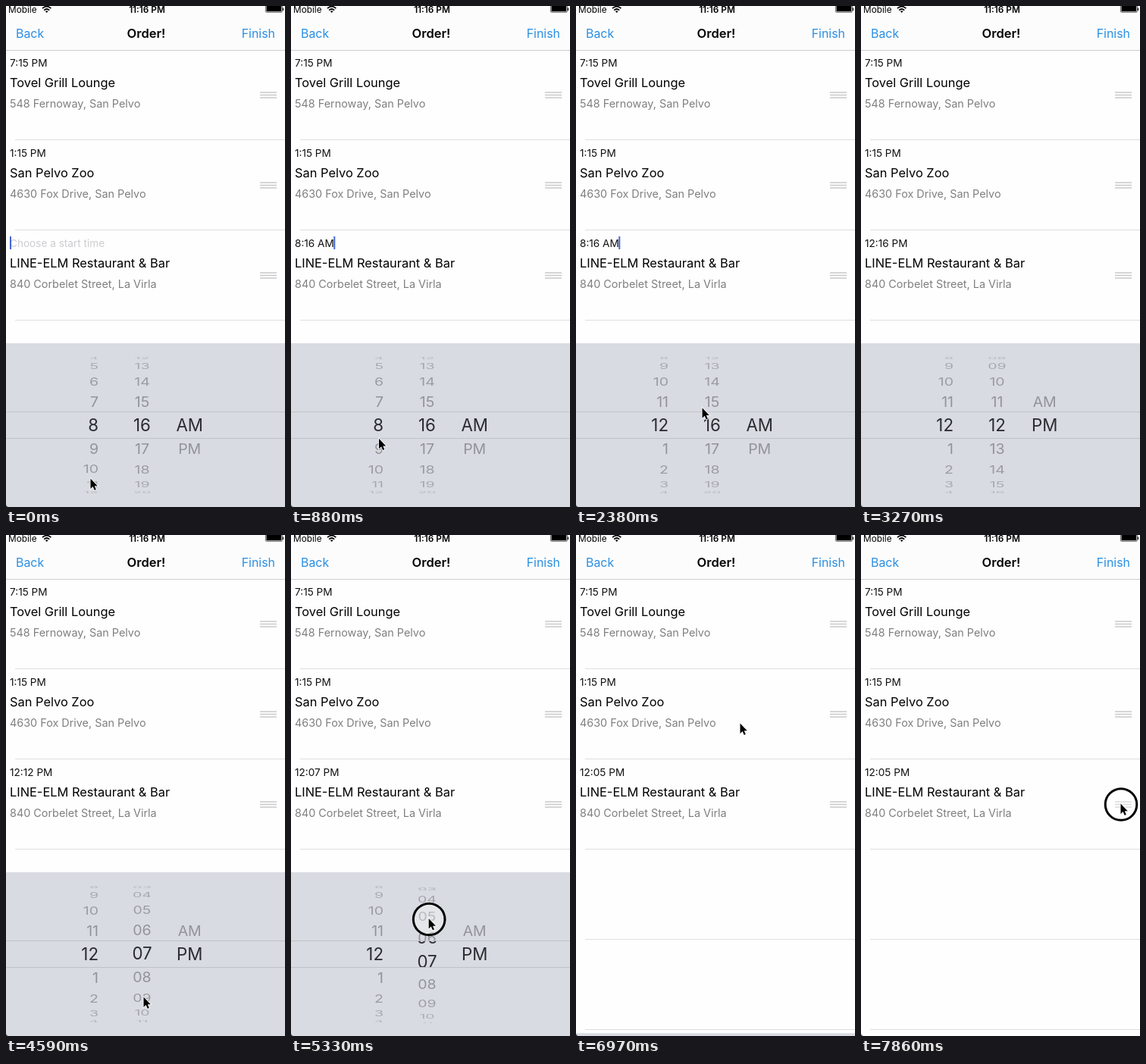
An HTML page that plays this animation: 368x661 px, repeating every 8000 ms.

```html
<!DOCTYPE html>
<html lang="en">
<head>
<meta charset="utf-8">
<title>Order</title>
<style>
  html, body { margin: 0; width: 100%; height: 100%; overflow: hidden; background: #fefefe; }
  svg { display: block; width: 100%; height: 100%; font-family: Inter, Roboto, sans-serif; }
  text { white-space: pre; }
  .status { font-size: 11.8px; }
  .bold { font-weight: 600; }
  .nav { font-size: 16.5px; }
  .link { font-size: 15.9px; fill: #2a8fe3; }
  .time { font-size: 13.6px; fill: #111; }
  .time.empty { fill: #cdcdd1; }
  .place { font-size: 16.4px; }
  .address { font-size: 14.4px; fill: #7f7f7f; }
  .rule { stroke: #dededf; }
  .grip { stroke: #c9c9cc; stroke-width: 1.3; }
  .band { stroke: #bfc2c7; }
  .rim { font-size: 19.5px; fill: #8f9196; }
  .lens { font-size: 22.3px; fill: #2a2c30; }
</style>
</head>
<body>
<svg viewBox="0 0 368 661" preserveAspectRatio="none">
  <defs>
    <clipPath id="inside"><path d="M0 536H368V570H0z"/></clipPath>
    <clipPath id="outside"><path d="M0 445H368V535H0zM0 571H368V661H0z"/></clipPath>
  </defs>
  <rect width="368" height="661" fill="#fefefe"/>
  <rect width="368" height="58" fill="#fcfcfc"/>
  <path d="M0 58.5H368" stroke="#cfcfd0"/>

  <text class="status" x="3" y="8.5">Mobile</text>
  <g fill="none" stroke="#000" stroke-width="1.7">
    <path d="M48 3.2Q53.7-2 59.4 3.2M50.2 5.6Q53.7 2.4 57.2 5.6"/>
    <path d="M51.9 7L53.7 9 55.5 7Q53.7 5.6 51.9 7z" fill="#000" stroke="none"/>
  </g>
  <text class="status bold" x="186" y="8.5" text-anchor="middle">11:16 PM</text>
  <rect x="342.4" y="-2" width="22" height="10.3" rx="1.5" fill="none" stroke="#000" stroke-width=".6"/>
  <path d="M343.5 0H363.3V7.2H343.5zM365 2.5H366V6H365z"/>

  <text class="link" x="13" y="42">Back</text>
  <text class="nav bold" x="185" y="42" text-anchor="middle">Order!</text>
  <text class="link" x="355" y="42" text-anchor="end">Finish</text>

  <g id="list"></g>
  <rect id="caret" y="304" width="2" height="17" fill="#4567d6"/>

  <g id="picker">
    <rect y="445" width="368" height="220" fill="#d8dbe1"/>
    <path class="band" d="M0 535.5H368M0 570.5H368"/>
    <g id="rim" clip-path="url(#outside)"></g>
    <g id="lens" clip-path="url(#inside)"></g>
  </g>

  <path d="M0 657.5Q.4 660.6 3.5 661H0z" fill="#333"/>
  <g id="pointer">
    <circle id="press" cx="1" cy="1.5" r="20.8" fill="#fff" fill-opacity=".3" stroke="#000" stroke-width="3"/>
    <path d="M.5 .5V14L3.6 11.1 5.7 15.8 7.8 14.9 5.8 10.3H9.8z"
          stroke="#fff" stroke-width="1.6" paint-order="stroke"/>
  </g>
</svg>
<script>
const LOOP = 8000, STEPS = 54, STEP = LOOP / STEPS;
const ROW_GAP = 119;
const MIDDLE = 553.3, RADIUS = 90, ROW_ANGLE = Math.PI / 9, ROW_HEIGHT = RADIUS * ROW_ANGLE;
const PAUSE = 400, BLINK = 900, BLINK_ON = 400;
const $ = id => document.getElementById(id);

function add(parent, tag, attrs, content = '') {
  const el = document.createElementNS('http://www.w3.org/2000/svg', tag);
  for (const name in attrs) el.setAttribute(name, attrs[name]);
  el.textContent = content;
  return parent.appendChild(el);
}

// Appointment list
const places = [
  ['7:15 PM', 'Tovel Grill Lounge', '548 Fernoway, San Pelvo'],
  ['1:15 PM', 'San Pelvo Zoo', '4630 Fox Drive, San Pelvo'],
  ['', 'LINE-ELM Restaurant & Bar', '840 Corbelet Street, La Virla']
];
let timeField;
places.forEach(([time, place, address], i) => {
  const row = add($('list'), 'g', { transform: `translate(0 ${ROW_GAP * i})` });
  timeField = add(row, 'text', { class: 'time', x: 5, y: 80 }, time);
  add(row, 'text', { class: 'place', x: 5, y: 107 }, place);
  add(row, 'text', { class: 'address', x: 5, y: 134 }, address);
  add(row, 'path', { class: 'grip', d: 'M335 114h22m-22 3.5h22m-22 3.5h22' });
});
for (let y = 176.5; y < 661; y += ROW_GAP) add($('list'), 'path', { class: 'rule', d: `M12 ${y}H368` });

// Picker wheels
const wrap = (n, size) => ((n % size) + size) % size;
const hourLabel = n => wrap(n - 1, 12) + 1;
const minuteLabel = n => String(wrap(n, 60)).padStart(2, '0');
const halfLabel = n => ['AM', 'PM'][n] || '';
const wheels = [
  { x: 122, anchor: 'end', label: hourLabel },
  { x: 179.5, anchor: 'middle', label: minuteLabel },
  { x: 242.2, anchor: 'middle', label: halfLabel }
];
for (const wheel of wheels) {
  const rows = (layer, length) => Array.from({ length }, () =>
    add($(layer), 'text', { class: layer, 'text-anchor': wheel.anchor, dy: '.36em' }));
  wheel.layers = [rows('rim', 9), rows('lens', 3)];
}

function turn(wheel, position) {
  for (const rows of wheel.layers) {
    const first = Math.round(position) - (rows.length >> 1);
    rows.forEach((row, i) => {
      const angle = (first + i - position) * ROW_ANGLE;
      const squash = Math.max(0, Math.cos(angle));
      row.textContent = wheel.label(first + i);
      row.setAttribute('transform', `translate(${wheel.x} ${MIDDLE + RADIUS * Math.sin(angle)}) scale(1 ${squash})`);
      row.setAttribute('opacity', .35 + .65 * squash);
    });
  }
}

// Motion
const progress = (t, from, to) => Math.min(1, Math.max(0, (t - from) / (to - from)));
const out = p => 1 - (1 - p) ** 2;
const smooth = p => p * p * (3 - 2 * p);
const mix = (a, b, p) => a + (b - a) * p;
const mixPoint = (a, b, p) => a.map((v, i) => mix(v, b[i], p));

// A drag moves its wheel with the finger; after release the wheel glides to rest
const HOURS = 0, MINUTES = 1;
const gestures = [
  { down: -500, up: -100, from: [111, 529], to: [111, 623], wheel: HOURS, rest: 8, settled: 500 },
  { down: 1180, up: 1640, from: [117, 552], to: [125, 485], wheel: HOURS, rest: 12, settled: 2380 },
  { down: 2540, up: 2900, from: [181, 546], to: [187, 673], wheel: MINUTES, rest: 12, settled: 3270 },
  { down: 3580, up: 4200, from: [181, 460], to: [181, 609], wheel: MINUTES, rest: 7, settled: 4800 },
  { down: 5200, up: 5720, from: [181, 496], to: [182, 554], wheel: MINUTES, rest: 5, settled: 6200 },
  { down: 6690, up: 6830, from: [204, 250], to: [216, 248] },
  { down: 7760, up: LOOP, from: [342, 354], to: [342, 354] }
];
const noon = gestures[1].settled, dismissed = gestures[5].down;

function pointerAt(t) {
  const i = gestures.findLastIndex(g => g.down <= t);
  const { down, up, from, to } = gestures[i], next = gestures[i + 1];
  if (t < up || !next) return mixPoint(from, to, smooth(progress(t, down, up)));
  return mixPoint(to, next.from, smooth(progress(t, up + PAUSE, next.down)));
}

function pickerAt(t) {
  const rows = [11, 16];
  let text = '', changed = 0;
  for (const { down, up, from, to, wheel, rest, settled } of gestures) {
    if (t < down || wheel === undefined) continue;
    const dragged = (from[1] - to[1]) / ROW_HEIGHT * smooth(progress(t, down, up));
    rows[wheel] = mix(rows[wheel] + dragged, rest, out(progress(t, up, settled)));
    if (t < settled) continue;
    const [hour, minute] = rows;
    text = `${hourLabel(hour)}:${minuteLabel(minute)} ${halfLabel(hour < 12 ? 0 : 1)}`;
    changed = settled;
  }
  return { rows: [...rows, smooth(progress(t, noon, noon + 350))], text, changed };
}

function draw(t) {
  const { rows, text, changed } = pickerAt(t);
  rows.forEach((position, i) => turn(wheels[i], position));
  $('picker').setAttribute('transform', `translate(0 ${217 * out(progress(t, dismissed, dismissed + 320))})`);

  timeField.textContent = text || 'Choose a start time';
  timeField.classList.toggle('empty', !text);
  $('caret').setAttribute('x', text ? 4.5 + timeField.getComputedTextLength() : 5);
  $('caret').setAttribute('opacity', +(t < dismissed && (t - changed) % BLINK < BLINK_ON));

  $('pointer').setAttribute('transform', `translate(${pointerAt(t)})`);
  $('press').setAttribute('opacity', +gestures.some(g => t >= g.down && t < g.up));
}

// The screen refreshes in even steps, like a recording
const start = performance.now();
function tick() {
  const t = (performance.now() - start) % LOOP;
  draw(Math.min(STEPS - 1, Math.floor((t + 12) / STEP)) * STEP);
  requestAnimationFrame(tick);
}
tick();
</script>
</body>
</html>
```
